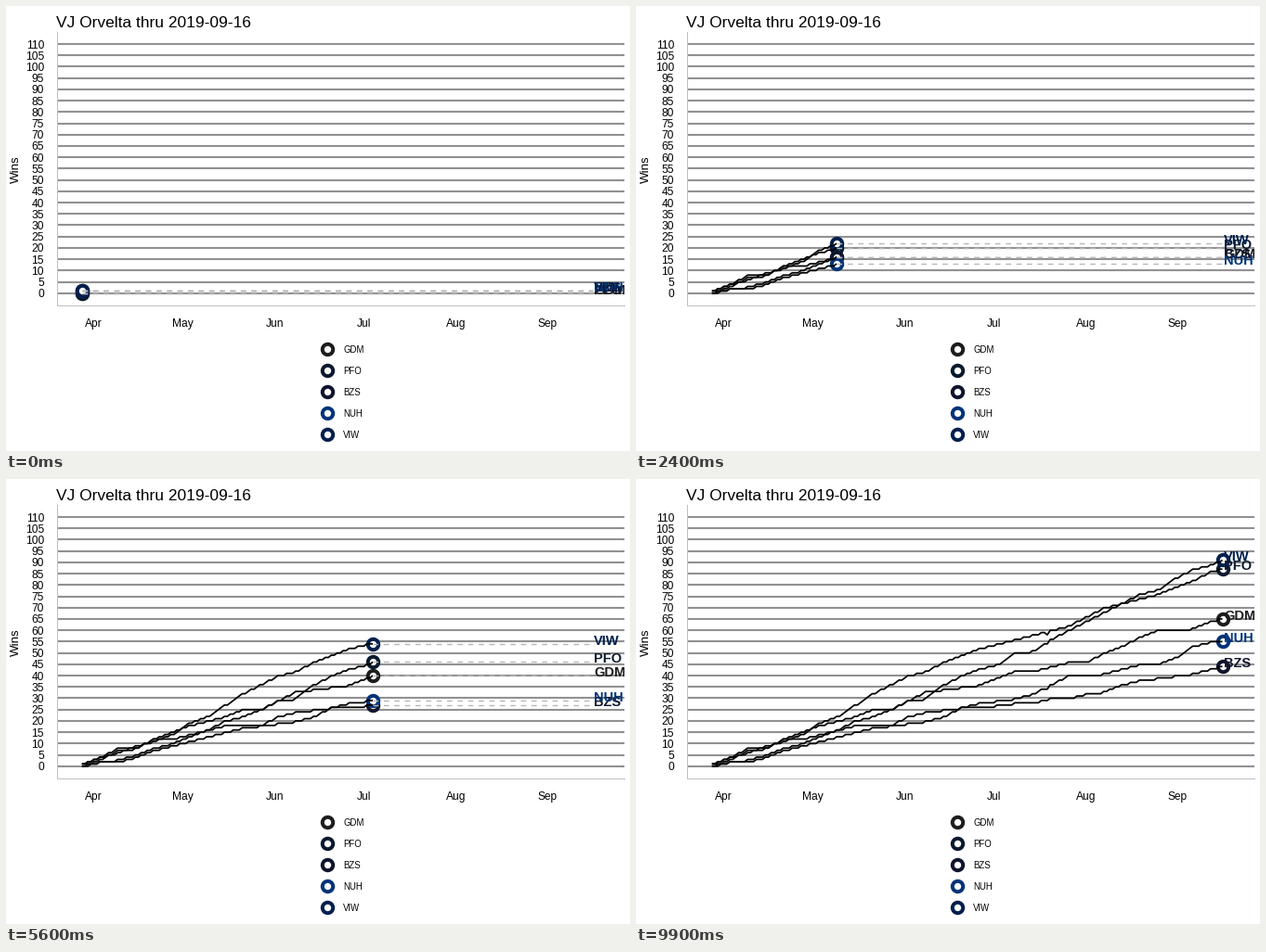
Animation, 672 px wide and 480 px high, one loop 10000 ms. Source, as a matplotlib script:

```python
import numpy as np
import matplotlib.pyplot as plt
from matplotlib.animation import FuncAnimation
from matplotlib.patches import Rectangle

plt.rcParams["font.family"] = "Liberation Sans"

W, H, DPI = 672, 480, 96
PT = 72 / DPI
FRAMES, LAST_DAY, STEP = 100, 172, 6
LEFT, RIGHT, TOP, BOTTOM = 54.5, 666, 27.6, 323.2
LABEL_X = 633

# name, colour, wins every six days, whether it dips in July
TEAMS = [
    ("GDM", "#1d1d1d", [0, 2, 3, 5, 8, 10, 13, 16, 20, 22, 25, 29, 33, 34, 35,
                        36, 39, 42, 42, 44, 46, 46, 50, 53, 57, 60, 60, 61, 64, 66], False),
    ("PFO", "#0a1a2e", [0, 3, 7, 8, 12, 15, 18, 20, 22, 25, 25, 29, 30, 36, 40,
                        43, 45, 50, 51, 56, 60, 64, 68, 72, 74, 76, 79, 82, 86, 88], True),
    ("BZS", "#10152e", [1, 4, 8, 8, 12, 12, 14, 16, 18, 18, 18, 22, 24, 25, 26,
                        26, 27, 28, 28, 30, 30, 32, 33, 36, 38, 39, 40, 41, 43, 45], False),
    ("NUH", "#003479", [1, 2, 2, 4, 7, 9, 11, 13, 15, 17, 18, 19, 20, 22, 26,
                        28, 29, 30, 32, 36, 40, 40, 41, 43, 45, 45, 48, 53, 55, 56], True),
    ("VIW", "#001f4e", [1, 4, 6, 9, 11, 14, 19, 22, 27, 32, 36, 40, 42, 46, 49,
                        52, 54, 56, 58, 60, 62, 66, 70, 72, 76, 78, 83, 87, 89, 92], True),
]
MONTHS = {"Apr": 4, "May": 34, "Jun": 65, "Jul": 95, "Aug": 126, "Sep": 157}
DAYS = np.arange(LAST_DAY + 1)


def x_of(day):
    return 81.8 + 3.196 * day


def y_of(wins):
    return 309.8 - 2.4436 * wins


def daily_wins(marks, dips):
    wins = np.floor(np.interp(DAYS, STEP * np.arange(len(marks)), marks) + 1e-6)
    if dips:
        wins[113] -= 1
    return wins


fig = plt.figure(figsize=(W / DPI, H / DPI), dpi=DPI, facecolor="white")
ax = fig.add_axes([0, 0, 1, 1])
ax.set(xlim=(0, W), ylim=(H, 0))
ax.axis("off")
panel = Rectangle((LEFT, TOP), RIGHT - LEFT, BOTTOM - TOP, fc="none", ec="none")
ax.add_patch(panel)


def write(x, y, text, px, **kw):
    kw = {"color": "black", "va": "baseline", **kw}
    return ax.text(x, y, text, fontsize=px * PT, **kw)


def rule(xs, ys, px, color, **kw):
    return ax.plot(xs, ys, lw=px * PT, color=color, **kw)[0]


def ring(x, y, color, z):
    return ax.plot([x], [y], "o", ms=11.4 * PT, mew=4 * PT, mfc="white",
                   mec=color, zorder=z)[0]


# fixed parts
for w in range(0, 111, 5):
    y = y_of(w)
    rule([LEFT, RIGHT], [y, y], 2.1, "#919191", solid_capstyle="butt", zorder=1)
    write(41, y + 4.5, str(w), 12, ha="right")
rule([LEFT, LEFT, RIGHT], [TOP, BOTTOM, BOTTOM], 1, "#bebebe", zorder=2)
for name, day in MONTHS.items():
    write(x_of(day), 346, name, 12, ha="center")
write(54, 23, "VJ Orvelta thru 2019-09-16", 17.33)
write(11, 176, "Wins", 13.33, rotation=90, ha="center", va="center")

# moving parts
tracks = []
for i, (name, color, marks, dips) in enumerate(TEAMS):
    ly = 370.3 + 23 * i
    ring(345.6, ly, color, 3)
    write(363, ly + 3.7, name, 9.6)

    ys = y_of(daily_wins(marks, dips))
    dot = ring(0, 0, color, 3)
    path = rule([], [], 1.75, "black", zorder=4, solid_capstyle="butt")
    lead = rule([], [], 1.42, "#b8b8b8", zorder=5, dashes=(4, 4))
    tag = write(LABEL_X, 0, name, 14.67, color=color, weight="bold",
                zorder=6, clip_on=True)
    tag.set_clip_path(panel)
    tracks.append((ys, dot, path, lead, tag))


def draw(k):
    day = int(k * LAST_DAY / (FRAMES - 1) + 0.82)
    x = x_of(day)
    for ys, dot, path, lead, tag in tracks:
        y = ys[day]
        dot.set_data([x], [y])
        path.set_data(x_of(DAYS[:day + 1]), ys[:day + 1])
        lead.set_data([x, x_of(LAST_DAY)], [y, y])
        tag.set_y(y + 1)
    return []


anim = FuncAnimation(fig, draw, frames=FRAMES, interval=100, repeat=True,
                     repeat_delay=0, init_func=lambda: draw(0))
plt.show()
```
